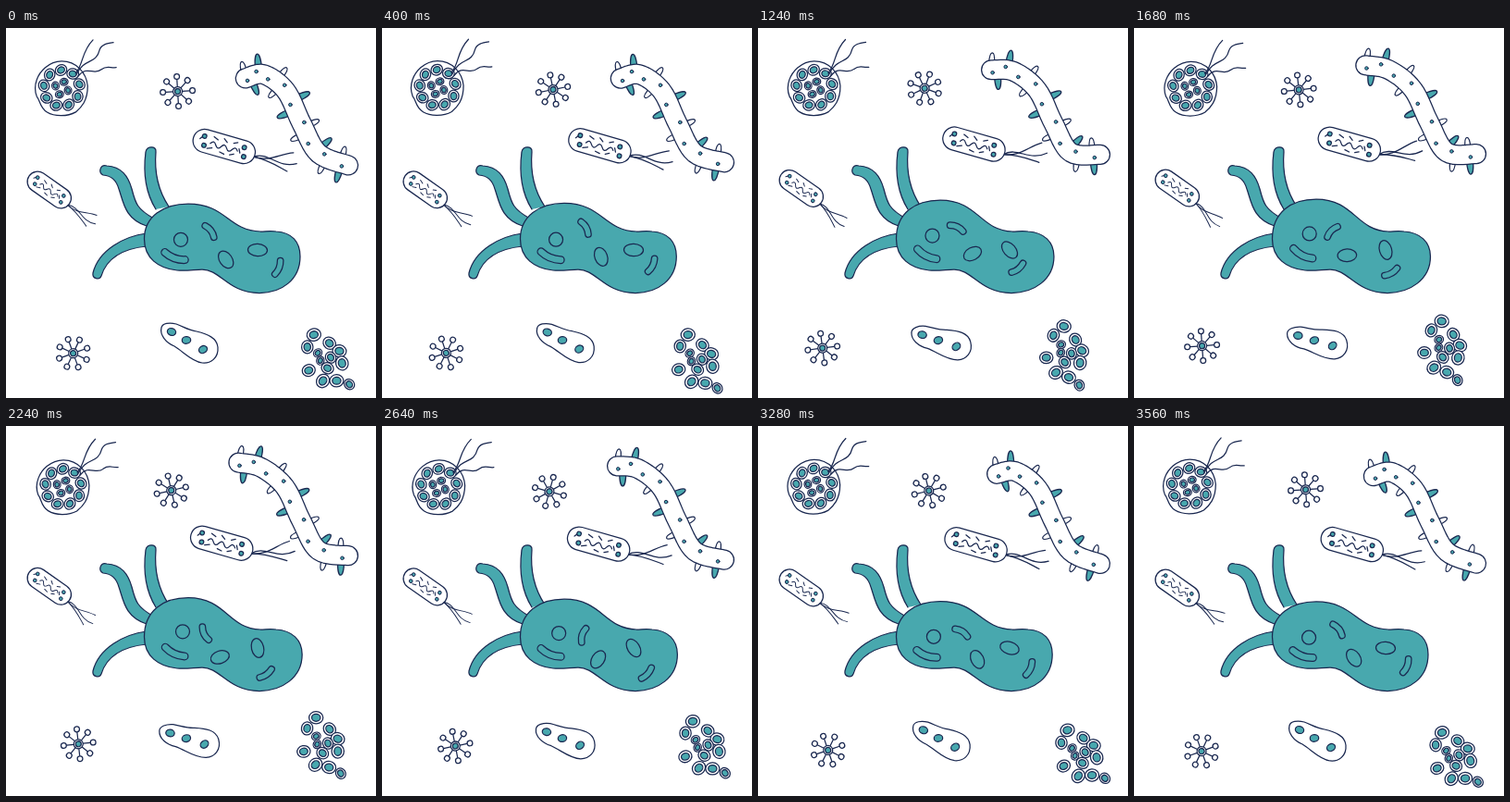
An HTML page for the animation above (3.6 s loop, 400 by 400 pixels).

```html
<!DOCTYPE html>
<html lang="en">
<head>
<meta charset="utf-8">
<title>Microbes</title>
<style>
html, body { margin: 0; width: 100%; height: 100%; overflow: hidden; background: #fff; }
svg { display: block; width: 100vw; height: 100vh; }
</style>
</head>
<body>
<svg id="stage" viewBox="0 0 400 400" fill="none" stroke="#1a2850" stroke-width="1.25" stroke-linecap="round" stroke-linejoin="round"></svg>
<script>
const TEAL = '#48a8ae', WHITE = '#fff', LOOP = 3600, TURN = 2 * Math.PI;
const stage = document.getElementById('stage');
const movers = [];

function el(tag, attrs, parent = stage) {
  const node = document.createElementNS('http://www.w3.org/2000/svg', tag);
  for (const k in attrs) node.setAttribute(k, attrs[k]);
  return parent.appendChild(node);
}
const group = (parent = stage) => el('g', {}, parent);
const path = (d, fill = 'none', parent = stage) => el('path', { d, fill }, parent);
const oval = (x, y, rx, ry, a, fill, parent) =>
  el('ellipse', { cx: x, cy: y, rx, ry, fill, transform: `rotate(${a} ${x} ${y})` }, parent);
const still = v => () => v;

// Sway around mid, highest at peak (part of the loop); dwell lingers there
const wave = (mid, amp, peak, dwell = 0, times = 1) => p => {
  const a = TURN * times * (p - peak);
  return mid + amp * Math.cos(a - dwell * Math.sin(a));
};
const place = (node, x, y, angle) => movers.push(p =>
  node.setAttribute('transform', `translate(${x(p)} ${y(p)}) rotate(${angle(p)})`));

function cell(x, y, r, tilt, parent) {
  oval(x, y, r, r * .88, tilt, WHITE, parent);
  oval(x, y, r * .62, r * .52, tilt, TEAL, parent);
}

// Large cell: tentacles, body, organelles
path('M162 196C152 180 148 158 151 134C152 127 163 127 162 134C160 158 166 178 176 193', TEAL);
path('M152 214C128 206 127 188 122 174C119 164 114 160 105 159C99 156 102 147 109 149C125 150 132 160 136 174C140 190 142 196 160 206', TEAL);
path('M152 222C128 225 100 240 94 265C93 271 101 273 103 268C108 252 122 239 152 236', TEAL);

const body = path('', TEAL), swell = wave(2.5, 2.5, .5);
movers.push(p => {
  const k = swell(p), top = 190 - k, right = 318 + k / 2;
  body.setAttribute('d', `M149.5 228C149.5 ${top + 14} 170 ${top} 197 ${top}` +
    `C238 ${top} 240 219 275 220C281 220 286 219 292 220C309 221 ${right} 231 ${right} 247` +
    `C${right} 272 298 286.5 274 286.5C240 286.5 232 261 212 261C204 261 196 263 185 262C165 260 149.5 249 149.5 228Z`);
});

function organelle(tag, attrs, x, y, angle) {
  place(el(tag, attrs), x, y, angle);
}
function rod(half, bend, width, x, y, angle) {
  const g = group(), d = `M${-half} ${-bend / 2}Q0 ${bend} ${half} ${-bend / 2}`;
  el('path', { d, 'stroke-width': width }, g);
  el('path', { d, 'stroke-width': width - 2.5, stroke: TEAL }, g);
  place(g, x, y, angle);
}
organelle('circle', { r: 7.5 }, wave(189.5, 1.7, .7), wave(225.5, 3.5, .05), still(0));
organelle('ellipse', { rx: 10.3, ry: 6.8 }, wave(234, 3.7, 0), wave(248.5, 4.5, .82), wave(117, 62, .5));
organelle('ellipse', { rx: 10.5, ry: 6.6 }, still(272), still(240), wave(40, 40, .56));
rod(11.5, 3, 9, still(182), wave(246.5, 1.5, 0), wave(24, 4, .42));
rod(7.8, -2.5, 7.8, wave(217.3, 3.7, 0), wave(220, 6, .73), wave(-28, 88, .12, .5));
rod(7.8, 2.2, 7.8, wave(286.5, 8.3, .98), wave(262.5, 6, .66), wave(-49, 19, .5));

// Spiky worm: the head and the tail sway, the middle stays
const SPINE = [[254.5, 47], [277, 47.5], [302, 67], [319.5, 103], [338, 135], [370, 142.5]];
const headX = wave(0, 4.3, 0), headY = wave(0, 8, .06), tailY = wave(0, 6.5, .93);
const spikes = [];
function spike(u, side, big) {
  const w = big ? 3.5 : 3, h = big ? 11.5 : 8.5;
  const d = `M${-w} 3C${-w} ${-h * .5} -2 ${-h} 0 ${-h}C2 ${-h} ${w} ${-h * .5} ${w} 3Z`;
  spikes.push({ u, side, node: path(d, big ? TEAL : WHITE) });
}
for (let i = 0; i < 7; i++) spike(i * .78, 1, i % 2);
[.35, 2.6, 4.7].forEach(u => spike(u, -1, true));
[1.75, 3.3, 4.25].forEach(u => spike(u, -1, false));
const skin = el('path', { 'stroke-width': 22.2 });
const flesh = el('path', { 'stroke-width': 19.7, stroke: WHITE });
const dots = Array.from({ length: 9 }, () => el('circle', { r: 1.8, fill: TEAL, 'stroke-width': 1 }));

// Point on a smooth curve through pts, with its unit normal
function along(pts, u) {
  const n = pts.length - 1, i = Math.min(n - 1, Math.floor(u)), s = u - i;
  const before = pts[Math.max(0, i - 1)], a = pts[i], b = pts[i + 1], after = pts[Math.min(n, i + 2)];
  const axis = k => {
    const m = (b[k] - before[k]) / 2, w = (after[k] - a[k]) / 2, d = b[k] - a[k];
    const c3 = m + w - 2 * d, c2 = 3 * d - 2 * m - w;
    return [a[k] + s * (m + s * (c2 + s * c3)), m + s * (2 * c2 + 3 * s * c3)];
  };
  const [x, dx] = axis(0), [y, dy] = axis(1), len = Math.hypot(dx, dy);
  return { x, y, nx: dy / len, ny: -dx / len };
}

movers.push(p => {
  const pts = SPINE.map(([x, y], i) => {
    const head = .35 ** i, tail = .1 ** (5 - i);
    return [x + headX(p) * head, y + headY(p) * head + tailY(p) * tail];
  });
  let d = '';
  for (let i = 0; i <= 40; i++) {
    const { x, y } = along(pts, i / 8);
    d += (i ? 'L' : 'M') + x.toFixed(2) + ' ' + y.toFixed(2);
  }
  skin.setAttribute('d', d);
  flesh.setAttribute('d', d);
  spikes.forEach(({ u, side, node }) => {
    const { x, y, nx, ny } = along(pts, u);
    const turn = Math.atan2(nx * side, -ny * side) * 360 / TURN;
    node.setAttribute('transform', `translate(${x} ${y}) rotate(${turn}) translate(0 -10)`);
  });
  dots.forEach((dot, i) => {
    const { x, y, nx, ny } = along(pts, .1 + i * .58), off = i % 2 ? 3 : -3;
    dot.setAttribute('cx', x + nx * off);
    dot.setAttribute('cy', y + ny * off);
  });
});

// Loose cluster: small cells in its heart, larger ones around
const CLUSTER = [[337, 314], [352, 327], [327, 326], [337, 335], [361, 338], [350, 343], [338, 344],
  [323, 352], [344, 354], [361, 352], [336, 367], [351, 370], [364, 377]];
const cluster = group();
CLUSTER.forEach(([x, y], i) => {
  const far = Math.hypot(x - 338, y - 340);
  cell((x - 345) * .97, (y - 346) * .96, 3.8 + 3.8 * Math.sin(Math.PI * far / 56), i * 50, cluster);
});
place(cluster, wave(342, 8.3, .85), wave(353.7, 7.8, .1), wave(-2.5, 12, .4));

// Round colony with whiskers
const colony = group();
path('M0 -29C16 -29 27 -16 28 -2C28 14 21 21 15 26C6 31 -8 31 -16 26C-24 21 -23 14 -27 9C-32 -4 -25 -16 -18 -22C-12 -27 -6 -29 0 -29Z', WHITE, colony);
function ring(count, radius, size, start) {
  for (let i = 0; i < count; i++) {
    const a = start + i * 360 / count, rad = a * TURN / 360;
    cell(radius * Math.cos(rad), radius * Math.sin(rad), size, a + 60, colony);
  }
}
ring(9, 19.5, 6.4, -92);
ring(4, 7.2, 4.4, 20);
['M15 -16C24 -26 21 -39 34 -52', 'M16 -15C25 -33 37 -25 41 -41C43 -47 49 -48 56 -49', 'M18 -13C27 -25 35 -13 43 -20C49 -25 53 -21 59 -22']
  .forEach(d => path(d, 'none', colony));
place(colony, wave(61, .9, .6), wave(65.2, .7, .7), wave(0, .8, .7));

// Spoked particles
function virus(x, y, angle) {
  const g = group();
  for (let i = 0; i < 8; i++) {
    const arm = el('g', { transform: `rotate(${i * 45})` }, g);
    path('M5 0H13', 'none', arm);
    el('circle', { cx: 16, r: 2.9, fill: WHITE }, arm);
  }
  el('circle', { r: 5, fill: WHITE }, g);
  el('circle', { r: 3, fill: TEAL }, g);
  place(g, x, y, angle);
}
virus(wave(181.8, 3.8, .02), wave(68, 3, .78), wave(-107, 14, .02, 0, 2));
virus(wave(73.7, 5.6, .72), wave(347.5, 4.3, .04), wave(-102, 8, .5));

// Bean
const bean = group();
path('M-28 -14C-27 -19 -19 -20 -12 -18C-4 -15 2 -11 10 -10C22 -7 32 -3 33 7C34 19 25 25 16 24C4 22 -4 12 -14 6C-23 2 -30 -6 -28 -14Z', WHITE, bean);
[-17, -1, 17].forEach((x, i) => oval(x, x * .56, 4.7, 3.8, 20 - i * 25, TEAL, bean));
place(bean, still(196), still(338), wave(-6.5, 6.5, 0));

// Capsules with tails
function capsule(len, wide, x, y, angle, swing) {
  const g = group(), tail = group(g), half = len / 2, k = len / 68;
  ['M0 0C14 -11 28 4 46 -8', 'M0 0C16 -2 27 1 39 3', 'M0 0C18 0 25 -12 39 -18']
    .forEach(d => path(d, 'none', el('g', { transform: `scale(${k})` }, tail)));
  place(tail, still(half - 1), still(2), swing);
  el('rect', { x: -half, y: -wide / 2, width: len, height: wide, rx: wide / 2, fill: WHITE }, g);
  const inner = el('g', { transform: `scale(${k})` }, g);
  path('M-15 1q3 -5 6 0t6 0t6 0t6 0t6 0', 'none', inner);
  path('M-13 -7l5 2M-2 -8l4 3M9 -6l4 -2M-17 7l5 -2M-3 7l5 1M8 7l4 -2M-27 -1l3 -4M16 -2l2 4', 'none', inner);
  for (const sx of [-1, 1])
    for (const sy of [-1, 1]) el('circle', { cx: sx * 22 + sy, cy: sy * 4.8, r: 2.3, fill: TEAL }, inner);
  place(g, x, y, angle);
}
capsule(69, 25, wave(234.3, 1.5, 0), wave(126.9, 1.4, .9), still(16), wave(-4, 7, 0));
capsule(53, 22, still(46.8), wave(174, 1, 0), still(35), wave(14, 5, .45));

function frame(now) {
  const p = now % LOOP / LOOP;
  movers.forEach(fn => fn(p));
  requestAnimationFrame(frame);
}
frame(0);
</script>
</body>
</html>
```
